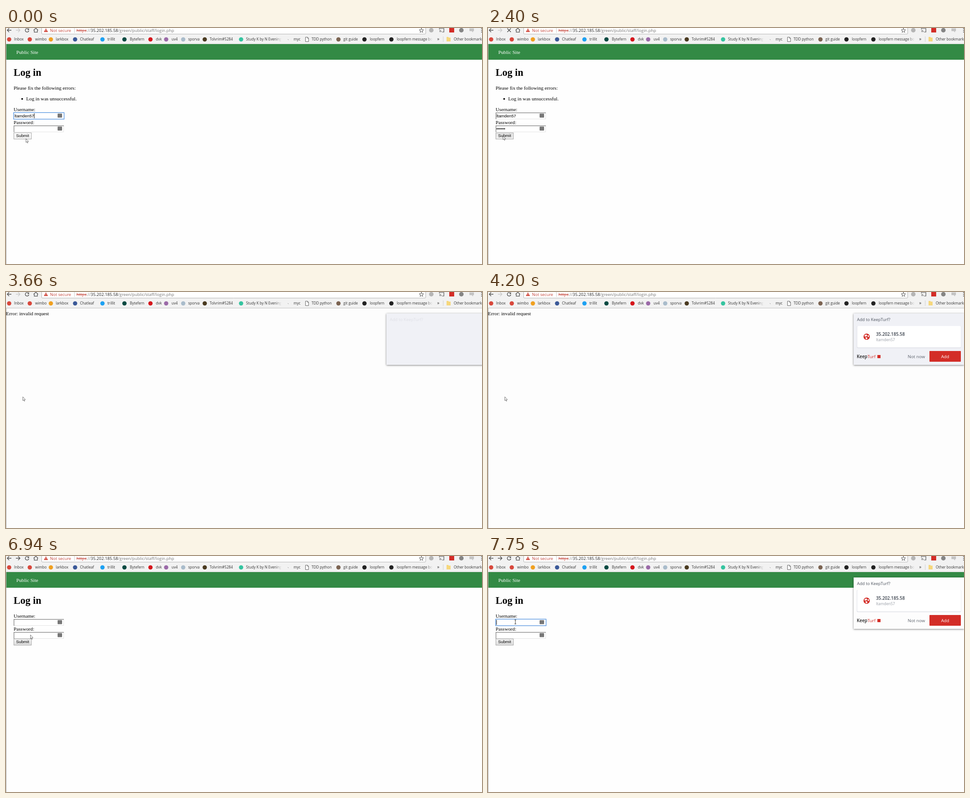
Write an HTML page with a canvas that moves like this. It is 1061 by 528 pixels and loops after 8000 ms.

```html
<!DOCTYPE html>
<html lang="en">
<head>
<meta charset="utf-8">
<title>Login form replay</title>
<style>
html, body { margin: 0; width: 100%; height: 100%; overflow: hidden; background: #fff; }
canvas { display: block; }
</style>
</head>
<body>
<canvas id="stage" width="1061" height="528"></canvas>
<script>
const ctx = document.getElementById('stage').getContext('2d');
const LOOP = 8000;
const SANS = '"Open Sans", "Noto Sans", sans-serif';
const SERIF = '"Liberation Serif", serif';
const ARIAL = '"Liberation Sans", sans-serif';
const USER = 'ltamden57', HOST = '35.202.185.58';

// Each track holds its latest entry: [time, ...values].
const cursorTrack = [
  [0, 44, 247, 'arrow'], [280, 46, 245, 'arrow'], [430, 65, 226, 'beam'],
  [850, 61, 237, 'arrow'], [1000, 45, 241, 'arrow'], [1120, 33, 241, 'arrow'],
  [2980, 34, 239, 'arrow'], [3140, 36, 237, 'arrow'], [3260, 37, 234, 'arrow'],
  [6820, 46, 188, 'arrow'], [6940, 54, 176, 'arrow'], [7100, 63, 151, 'beam'],
  [7240, 61, 147.5, 'beam']
];
const typedTrack = [[0, 0], [850, 1], [1000, 3], [1120, 4], [1550, 5], [1820, 6]];
const pageTrack = [[0, 'failed'], [2840, 'error'], [4750, 'resubmit'], [6400, 'login']];
const focusTrack = [[0, 'user'], [580, 'password'], [2250, ''], [7630, 'user']];
// Popup slide with overshoot: left edge and content opacity.
const slideTrack = [[0, 1024, 0], [140, 848, .1], [270, 798, 1], [390, 801, 1], [530, 818, 1], [650, 815, 1]];

const held = (track, t) => track.filter(k => k[0] <= t).pop().slice(1);

function rect(x, y, w, h, color) {
  ctx.fillStyle = color;
  ctx.fillRect(x, y, w, h);
}
function box(x, y, w, h, color, width = 1) {
  ctx.strokeStyle = color;
  ctx.lineWidth = width;
  ctx.strokeRect(x, y, w, h);
}
function disc(x, y, r, color) {
  ctx.fillStyle = color;
  ctx.beginPath();
  ctx.arc(x, y, r, 0, 7);
  ctx.fill();
}
function rounded(x, y, w, h, r, color) {
  ctx.fillStyle = color;
  ctx.beginPath();
  ctx.roundRect(x, y, w, h, r);
  ctx.fill();
}
function path(d, { x = 0, y = 0, fill, stroke, width = 1 }) {
  const p = new Path2D(d);
  ctx.save();
  ctx.translate(x, y);
  if (fill) { ctx.fillStyle = fill; ctx.fill(p); }
  if (stroke) { ctx.strokeStyle = stroke; ctx.lineWidth = width; ctx.stroke(p); }
  ctx.restore();
}
// Draws text and returns the x where it ends.
function text(str, x, y, font, color, align = 'left') {
  ctx.font = font;
  ctx.fillStyle = color;
  ctx.textAlign = align;
  ctx.fillText(str, x, y);
  return x + ctx.measureText(str).width;
}
function fadeOut(x) {
  const g = ctx.createLinearGradient(x - 14, 0, x, 0);
  g.addColorStop(0, '#333');
  g.addColorStop(1, '#3330');
  return g;
}

const bookmarks = [
  [7, '#d8483c', 'Inbox', 18], [53, '#d8483c', 'wimbo', 65], [100, '#f0a020', 'larkbox', 111],
  [154, '#3b5998', 'Chatleaf', 165], [215, '#1da1f2', 'trillit', 226], [264, '#064a42', 'Bytefern', 276],
  [322, '#d5161c', 'dvk', 334], [357, '#9b6aa8', 'uv4', 369], [395, '#a9bccb', 'sporva', 406],
  [443, '#4a3a20', 'Tolvrim#5284', 454], [524, '#35c4a0', 'Study K by N Evenings', 535, 614],
  [0, '', 'myc', 641], [0, '', 'TDD python', 681], [741, '#7b6351', 'git guide', 752],
  [799, '#222', 'loopfern', 811], [859, '#222', 'loopfern message board', 871, 951],
  [0, '', 'Other bookmarks', 998]
];

function drawBrowser(loading, canGoForward) {
  const ink = '#505050';
  rect(0, 0, 1061, 36, '#f2f2f2');
  rect(79, 0, 857, 14, '#fff');
  path('M79.5 0V12Q79.5 13.5 81 13.5H934Q935.5 13.5 935.5 12V0', { stroke: '#b4b4b4' });

  path('M12 5H3M7 .8L2.8 5L7 9.2', { stroke: ink, width: 1.4 });
  path('M22 5H31M27 .8L31.2 5L27 9.2', { stroke: canGoForward ? ink : '#cacaca', width: 1.4 });
  if (loading) path('M43 1L51 9M51 1L43 9', { stroke: ink, width: 1.5 });
  else {
    path('M50.1 2.6A4 4 0 1 0 50.9 6', { stroke: ink, width: 1.4 });
    path('M51.3 .6V4.6H47.3Z', { fill: ink });
  }
  path('M61.5 5L66.5 .5L71.5 5M63 4.5V9.3H70V4.5', { stroke: ink, width: 1.3 });

  path('M89 .8L93.5 9H84.5Z', { fill: '#cf4236' });
  rect(88.5, 3.6, 1, 2.6, '#fff');
  rect(88.5, 7, 1, 1, '#fff');
  const urlFont = '9.33px ' + SANS;
  text('Not secure', 98, 8.5, urlFont, '#c5463b');
  rect(152, 0, 1, 11, '#cfcfcf');
  let x = text('https', 157, 8.5, urlFont, '#c5463b');
  rect(157, 5, x - 157, 1, '#c5463b');
  x = text('://', x, 8.5, urlFont, '#808080');
  x = text(HOST, x, 8.5, urlFont, '#222');
  text('/green/public/staff/login.php', x, 8.5, urlFont, '#777');

  path('M0 -5L1.4 -1.6L5 -1.4L2.2 .9L3.1 4.4L0 2.5L-3.1 4.4L-2.2 .9L-5 -1.4L-1.4 -1.6Z',
    { x: 926, y: 5.5, stroke: ink });
  disc(948, 5, 5, '#b5b5b5');
  path('M966 3V1H976V9H972M966 5A4 4 0 0 1 970 9M966 7.4A2 2 0 0 1 967.6 9', { stroke: ink, width: 1.2 });
  rect(988, 0, 11, 10, '#d32d27');
  disc(1015, 5, 5, '#858585');
  path('M1033 1H1043V7H1041V10L1038 7H1033Z', { fill: '#c4c4c4' });
  for (const y of [1, 5, 9]) disc(1060, y, 1, ink);

  for (const [iconX, color, label, labelX, end] of bookmarks) {
    if (color) disc(iconX, 25.5, 4.8, color);
    text(label, labelX, 28, '8.1px ' + SANS, end ? fadeOut(end) : '#333');
  }
  path('M628 25L630 27', { stroke: '#999' });
  path('M667.5 20.5H672L674.5 23V30.5H667.5ZM672 20.5V23H674.5', { fill: '#fff', stroke: '#666' });
  text('»', 961, 28, '10px ' + SANS, '#333');
  rect(974, 19, 1, 12, '#cfcfcf');
  path('M982 20H986L987 21.5H991V30H982Z', { fill: '#f6d77c' });
}

function drawField(y, focused, value, caretX) {
  rect(17, y, 112, 15, '#fff');
  if (focused) {
    box(17, y + .3, 112.5, 14.6, '#5a97e0', 1.4);
  } else {
    rect(17, y + 14, 112, 1, '#e3e3e3');
    rect(128, y, 1, 15, '#e3e3e3');
    rect(17, y, 112, 1.4, '#888');
    rect(17, y, 1.4, 15, '#888');
  }
  rounded(115, y + 2.5, 10, 9, 1, '#777');
  if (typeof value === 'string') text(value, 19, y + 10.5, '9.33px ' + ARIAL, '#000');
  else for (let i = 0; i < value; i++) disc(20.3 + 3.3 * i, y + 7.5, 1.25, '#000');
  if (focused && caretX) rect(caretX, y + 2, 1, 11, '#000');
}

function drawButton(y, state) {
  const g = ctx.createLinearGradient(0, y, 0, y + 15);
  const [top, bottom] = { normal: ['#f6f6f6', '#dcdcdc'], hover: ['#fdfdfd', '#f1f1f1'], pressed: ['#e4e4e4', '#efefef'] }[state];
  g.addColorStop(0, top);
  g.addColorStop(1, bottom);
  rect(17, y, 40, 15, g);
  box(17.5, y + .5, 39, 14, '#a4a4a4');
  text('Submit', 37, y + 10.3, '9.33px ' + ARIAL, '#000', 'center');
}

function drawLogin(t, failed) {
  const font = '11.2px ' + SERIF;
  const [focus] = held(focusTrack, t);
  const [typed] = held(typedTrack, t);
  const top = failed ? 182 : 133.6;
  rect(1, 36, 1060, 35, '#338a45');
  text('Public Site', 23, 58, font, '#fff');
  text('Log in', 17, 107, 'bold 22.4px ' + SERIF, '#000');
  if (failed) {
    text('Please fix the following errors:', 17, 138, font, '#000');
    disc(36, 158.7, 1.9, '#000');
    text('Log in was unsuccessful.', 45, 162, font, '#000');
  }
  text('Username:', 17, top + 4.3, font, '#000');
  const userCaret = failed ? (t < 280 ? 62.5 : 0) : 18.5;
  drawField(Math.round(top + 7), focus === 'user', failed ? USER : '', userCaret);
  text('Password:', 17, top + 33, font, '#000');
  drawField(Math.round(top + 36), focus === 'password', failed ? typed : 0, 18.5 + 3.3 * typed);
  const hovered = failed ? t < 430 || t >= 1000 : t >= 6820 && t < 6940;
  drawButton(Math.round(top + 51.6), failed && t >= 2250 ? 'pressed' : hovered ? 'hover' : 'normal');
}

function drawResubmit() {
  const grey = '#646464', dark = '#585858', font = '10px ' + SANS;
  rect(1, 37, 1060, 491, '#f7f7f7');
  path('M324.2 129.2H339V138.5H347.8V157.8H324.2Z', { stroke: dark, width: 2.4 });
  rect(340.5, 127, 9, 10, '#f7f7f7');
  path('M338 128H341.5V130.5H344V133H346.5V135.5H349V139.5H338ZM340.5 130.5V137H346.5V135.5H344V133H341.5V130.5Z', { fill: dark });
  rect(329.5, 137, 2.4, 4, dark);
  rect(340.5, 141, 2.4, 2.4, dark);
  rect(332, 148, 8, 2.3, dark);
  rect(329.5, 150.3, 2.5, 2.3, dark);
  rect(340, 150.3, 2.5, 2.3, dark);
  text('Confirm Form Resubmission', 323, 208.5, '15.8px ' + SANS, '#333');
  text('This webpage requires data that you entered earlier in order to be properly displayed. You', 323, 236, font, grey);
  text('can send this data again, but by doing so you will repeat any action this page previously', 323, 253, font, grey);
  text('performed.', 323, 270, font, grey);
  text('Press the reload button to resubmit the data needed to load the page.', 323, 297, font, grey);
  text('ERR_CACHE_MISS', 323, 324, '8.15px ' + SANS, grey);
}

function drawPopup(elapsed, back) {
  const [left, opacity] = held(slideTrack, elapsed);
  ctx.save();
  ctx.translate(left, 48);
  ctx.save();
  ctx.shadowColor = 'rgba(0,0,0,.5)';
  ctx.shadowBlur = 4;
  ctx.shadowOffsetY = 1;
  rect(0, 0, 246, 115, back);
  ctx.restore();
  ctx.globalAlpha = opacity;
  text('Add to KeepTurf?', 7.5, 17, '9.3px ' + SANS, '#4c535e');
  // The card and buttons fade in behind the title.
  ctx.globalAlpha = opacity ** 4;
  rounded(7, 28, 232.5, 49.5, 2, '#dfe1e8');
  rounded(8, 28, 231, 48, 2, '#fff');
  disc(29, 52, 7, '#d32d27');
  path('M-4 -4L0 -5L1 -2L-2 0L-5 -1ZM2 -3L5 -3L5 0L3 1ZM-3 2L0 1L2 4L-1 6Z', { x: 29, y: 52, fill: '#fff' });
  text(HOST, 50, 49.5, '600 9.8px ' + SANS, '#3a414c');
  text(USER, 50, 61.5, '8.4px ' + SANS, '#979ca5');
  const markX = text('Keep', 7, 99.5, '600 9.8px ' + SANS, '#222');
  const markEnd = text('Turf', markX, 99.5, '9.8px ' + SANS, '#d32d27');
  rect(markEnd + 4, 93, 7, 7, '#d32d27');
  text('Not now', 120.5, 99.5, '9.8px ' + SANS, '#5c626c');
  rounded(169, 84, 70, 24, 1, '#d32d27');
  text('Add', 204, 99.5, '9.8px ' + SANS, '#fff', 'center');
  ctx.restore();
}

function drawCursor(t) {
  const [x, y, kind] = held(cursorTrack, t);
  if (kind === 'beam') path('M-2 -4.5H2M0 -4.5V4.5M-2 4.5H2', { x, y, stroke: '#333' });
  else path('M.5 .5V9L2.4 7.3L3.7 10.3L5 9.7L3.7 6.8H6.3Z', { x, y, fill: '#fff', stroke: '#555', width: .8 });
}

function render(t) {
  const [page] = held(pageTrack, t);
  rect(0, 0, 1061, 528, page === 'error' ? '#fdfdfd' : '#fefefe');
  drawBrowser((t >= 2400 && t < 2840) || (t >= 5970 && t < 6400), t >= 4750);
  rect(0, 35.5, 1061, 1, '#bdbdbd');
  if (page === 'error') text('Error: invalid request', 0, 52, '11.2px ' + SERIF, '#000');
  else if (page === 'resubmit') drawResubmit();
  else drawLogin(t, page === 'failed');
  rect(0, 36, 1, 492, '#b0b0b0');
  if (t >= 3510 && t < 4750) drawPopup(t - 3510, '#f0f1f6');
  if (t >= 7100) drawPopup(t - 7100, '#fdfdfd');
  drawCursor(t);
}

const start = performance.now();
function tick() {
  render((performance.now() - start) % LOOP);
  requestAnimationFrame(tick);
}
tick();
</script>
</body>
</html>
```
